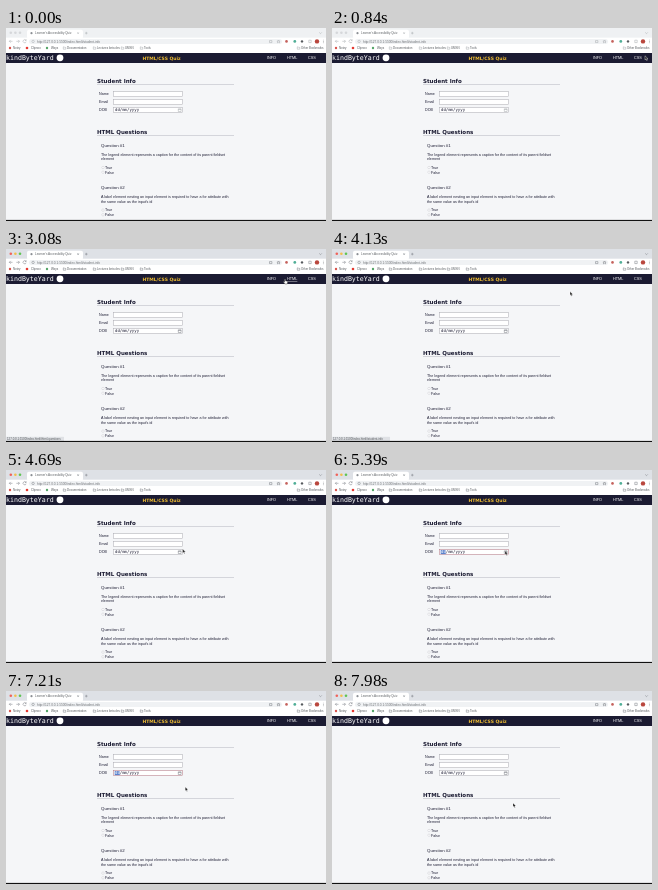
Recreate the animation shown at these times as an HTML page. Size 320 by 193 pixels, loop 8000 ms.

```html
<!DOCTYPE html>
<html lang="en">
<head>
<meta charset="utf-8">
<title>Accessibility Quiz</title>
<style>
  html, body { margin: 0; width: 100%; height: 100%; overflow: hidden; background: #f5f6f8; }
  svg { display: block; width: 100%; height: 100%; }
  text { font-family: "Liberation Sans", Arial, sans-serif; fill: #1b1b32; white-space: pre; }
  .heading { font: bold 5.5px "DejaVu Sans", sans-serif; }
  .title { font: bold 4.5px "DejaVu Sans", sans-serif; fill: #f1be32; }
  .brand { font: 6.6px "DejaVu Sans Mono", monospace; fill: #fff; }
  .body { font-size: 3.68px; }
  .question { font-size: 4.4px; }
  .link { font-size: 3.8px; fill: #fff; }
  .link.hover { text-decoration: underline; }
  .date { font: 4px "DejaVu Sans Mono", monospace; }
  .tab { font-size: 3px; fill: #5c6064; }
  .url { font-size: 3.2px; fill: #6a6e72; }
  .small { font-size: 2.9px; fill: #55595d; }
  .line { fill: none; stroke: #777b80; stroke-width: .5; }
  .box { fill: #fff; stroke: #a9a9b0; stroke-width: .5; }
  .box.focus { stroke: #b0707c; }
  .radio { fill: #fff; stroke: #bdbdc4; stroke-width: .4; }
  .inactive .strip { fill: #eff1f3; }
  .inactive .light { fill: #d5d7da; }
  .inactive .line { stroke: #a5a8ac; }
</style>
</head>
<body>
<svg id="stage" viewBox="0 0 320 193" preserveAspectRatio="none"></svg>
<script>
const stage = document.getElementById('stage');

function add(tag, attrs, content = '', parent = stage) {
  const el = document.createElementNS('http://www.w3.org/2000/svg', tag);
  for (const key in attrs) el.setAttribute(key, attrs[key]);
  el.textContent = content;
  return parent.appendChild(el);
}
const text = (x, y, cls, content, parent) => add('text', { x, y, class: cls }, content, parent);
const rect = (x, y, width, height, fill, rx = 0, parent) =>
  add('rect', { x, y, width, height, fill, rx }, '', parent);
const dot = (cx, cy, r, fill) => add('circle', { cx, cy, r, fill });
const path = (d, parent) => add('path', { d, class: 'line' }, '', parent);

function drawBrowser() {
  rect(0, 0, 320, 10, '#dee1e6').classList.add('strip');
  ['#f0625a', '#f3be4b', '#5fc454'].forEach((color, i) =>
    dot(4.8 + i * 4.6, 4.8, 1.3, color).classList.add('light'));
  rect(21, 1.8, 56, 9, '#fff', 1.8);
  dot(25.5, 5.2, 1.1, '#8b8f94');
  text(29, 6.2, 'tab', "Learner's Accessibility Quiz");
  path('M71.3 4.3l1.6 1.6m0-1.6l-1.6 1.6M79 5.1h2.6m-1.3-1.3v2.6M313.2 4.4l1.3 1.3 1.3-1.3');

  rect(0, 9.7, 320, 15.3, '#fff');
  path('M6.5 13.3H3.3m1.4-1.4l-1.4 1.4 1.4 1.4M10.3 13.3h3.2m-1.4-1.4l1.4 1.4-1.4 1.4');
  path('M20 12.3a1.6 1.6 0 1 0 .2 1.5M20.2 11.3v1.3h-1.3');
  rect(23, 10.9, 253, 5.1, '#f0f2f4', 2.5);
  path('M28.3 13.4a1.2 1.2 0 1 0-2.4 0a1.2 1.2 0 1 0 2.4 0');
  text(31, 14.5, 'url', 'http://127.0.0.1:5500/index.html#student-info');
  path('M263.5 14.6v-2h2.4v2zM272.5 12l.6 1h1l-.8.8.3 1-1.1-.6-1.1.6.3-1-.8-.8h1z');
  dot(280.5, 13.4, 1.3, '#c5615c');
  dot(288.8, 13.4, 1.4, '#4fae96');
  dot(296, 13.4, 1.2, '#55595d');
  path('M302.8 12.2h2.4v2.4h-2.4z');
  dot(311, 13.4, 2.2, '#b9473e');
  [12, 13.4, 14.8].forEach(y => dot(317.3, y, .35, '#55595d'));

  dot(4, 20, 1.2, '#d9534b');
  dot(21, 20, 1.3, '#e53a32');
  dot(41, 20, 1.2, '#54a568');
  [[7, 'Notey'], [25, 'Clipnoo'], [45, 'Ways'], [61, 'Documentation'],
   [91, 'Lectures beta dev'], [119, 'UMSN'], [138, 'Tools'], [295, 'Other Bookmarks']]
    .forEach(([x, label], i) => {
      text(x, 21, 'small', label);
      if (i > 2) path(`M${x - 3.7} 18.9h1l.4.5h1.1v1.8h-2.5z`);
    });
}

function drawQuestion(y, number, lines) {
  text(95, y, 'question', 'Question #' + number);
  lines.forEach((line, i) => text(95, y + 9 + i * 4.5, 'body', line));
  ['True', 'False'].forEach((label, i) => {
    const base = y + 22.2 + i * 4.7;
    add('circle', { cx: 97, cy: base - 1.3, r: 1.2, class: 'radio' });
    text(99, base, 'body', label);
  });
}

rect(0, 0, 320, 193, '#f5f6f8');
drawBrowser();
rect(0, 25, 320, 10, '#1b1b32');
text(0, 32, 'brand', 'kindByteYard');
dot(54, 29.8, 3.4, '#fff');
text(136.4, 31.6, 'title', 'HTML/CSS Quiz');
const links = [[261, 'INFO'], [281, 'HTML'], [302, 'CSS']].map(([x, s]) => text(x, 31.3, 'link', s));

[[54.5, 'Student Info'], [105.5, 'HTML Questions']].forEach(([y, label]) => {
  text(91, y, 'heading', label);
  rect(91, y + 1.8, 137, .7, '#c6c7ce');
});
const fields = ['Name', 'Email', 'DOB'].map((label, i) => {
  const y = 63.7 + i * 7.9;
  text(93, y + 3.6, 'body', label);
  return add('rect', { x: 107.5, y, width: 69, height: 5, class: 'box' });
});
const highlight = rect(108.7, 80.1, 5.1, 4, '#5b82cc');
const day = text(109, 83.3, 'date', 'dd');
text(113.8, 83.3, 'date', '/mm/yyyy');
path('M172.3 80.8h2.8v2.7h-2.8zM172.3 81.5h2.8');

drawQuestion(118.6, 1, [
  'The legend element represents a caption for the content of its parent fieldset', 'element']);
drawQuestion(161.2, 2, [
  'A label element nesting an input element is required to have a for attribute with',
  "the same value as the input's id"]);

const status = add('g', {});
rect(-1, 187.8, 59, 4.4, '#dfe1e5', .6, status);
const statusText = text(1, 191, 'small', '', status);
rect(0, 191.9, 320, 1.1, '#111');

const ring = add('circle', { fill: '#77777722', stroke: '#2b2530', 'stroke-width': .9 });
const pointer = add('g', { stroke: '#fff', 'stroke-width': .4, fill: '#111' });
const arrow = add('path', { d: 'M0 0v4l.95-.85.65 1.5.75-.3-.65-1.45h1.25z' }, '', pointer);
const hand = add('path', {
  d: 'M-.4 0q.5-.5.9 0v1.6l1.8.4q.5.2.4.8l-.5 1.9h-2.3l-1.5-2q0-.6.6-.4l.6.5z', fill: '#fff', stroke: '#222'
}, '', pointer);

// time, x, y
const route = [
  [350, 298, 104], [700, 313, 28], [840, 313, 27.8], [1260, 314, 28], [1400, 314, 28.5],
  [1890, 266.5, 31.5], [2730, 266, 30.5], [2940, 272, 30], [3220, 286, 30.5], [3500, 287, 30.5],
  [3710, 306, 30.5], [3920, 306, 30.5], [4060, 266, 32], [4130, 238, 42.5], [4340, 222, 57],
  [4760, 173, 80.8], [6720, 173, 80.8], [7000, 175, 85], [7280, 180, 98],
  [7630, 180, 98], [7980, 181, 112]
];
const clicks = [[4900, 173.5, 82.5], [6300, 173.2, 82.7], [7350, 181, 99]];
const hovers = [[1820, 2870, 0], [3010, 3430, 1], [3570, 3920, 2], [3990, 4130, 0]];
const pages = [[2660, 2940, 'student-info'], [2940, 3500, 'html-questions'],
  [3500, 3990, 'css-questions'], [3990, 4620, 'student-info']];

const active = (spans, t) => (spans.find(([from, to]) => t >= from && t < to) || [])[2];
const show = (el, on) => el.setAttribute('visibility', on ? 'inherit' : 'hidden');

function pointAt(t) {
  const i = route.findIndex(step => step[0] > t);
  if (i < 0) return route[route.length - 1].slice(1);
  const [t0, x0, y0] = route[i - 1], [t1, x1, y1] = route[i];
  const p = (t - t0) / (t1 - t0), ease = p * p * (3 - 2 * p);
  return [x0 + (x1 - x0) * ease, y0 + (y1 - y0) * ease];
}

function render(t) {
  stage.classList.toggle('inactive', t < 2100);

  const hover = active(hovers, t), page = active(pages, t);
  links.forEach((link, i) => link.classList.toggle('hover', i === hover));
  show(status, page);
  statusText.textContent = page ? '127.0.0.1:5500/index.html#' + page : '';

  const visible = t >= route[0][0];
  pointer.style.display = visible ? '' : 'none';
  if (visible) pointer.setAttribute('transform', `translate(${pointAt(t)})`);
  show(hand, hover !== undefined);
  show(arrow, hover === undefined);

  const focused = t >= 4970 && t < 7350;
  show(highlight, focused);
  day.style.fill = focused ? '#fff' : '';
  fields[2].classList.toggle('focus', focused);

  const click = clicks.find(([at]) => t >= at && t < at + 210);
  show(ring, click);
  if (click) {
    ring.setAttribute('cx', click[1]);
    ring.setAttribute('cy', click[2]);
    ring.setAttribute('r', t - click[0] < 70 ? 3.5 : 4.6);
  }
}

function tick() {
  render(Math.floor(performance.now() % 8000 / 70) * 70);
  requestAnimationFrame(tick);
}
tick();
</script>
</body>
</html>
```
